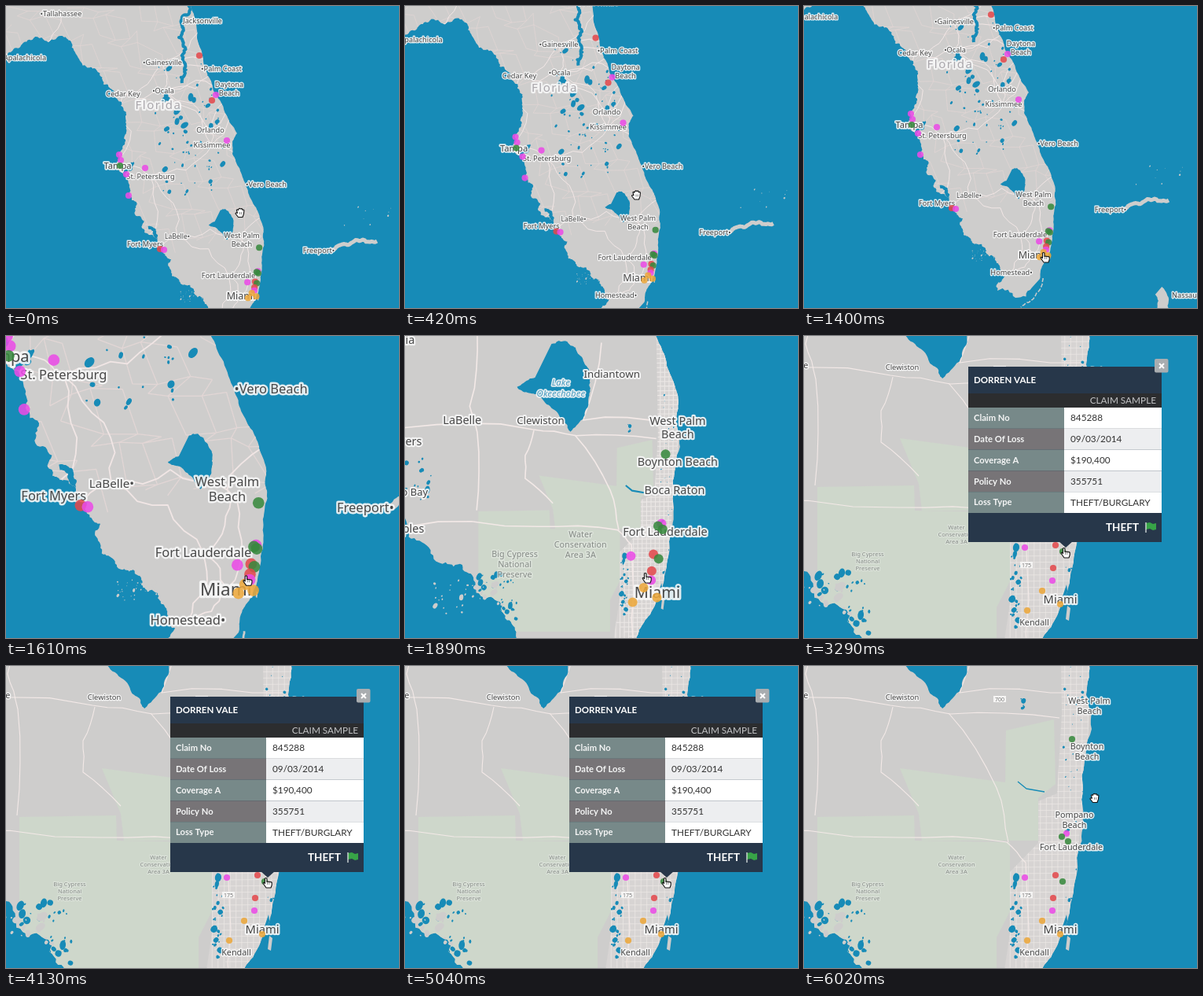
Recreate the animation shown at these times as an HTML page with a canvas. Size 500 by 384 pixels, loop 6090 ms.

```html
<!DOCTYPE html>
<html lang="en">
<head>
<meta charset="utf-8">
<title>Claims map</title>
<style>
  html, body { margin: 0; width: 100%; height: 100%; overflow: hidden; background: #178bb7; }
  canvas { display: block; }
</style>
</head>
<body>
<canvas id="stage" width="500" height="384"></canvas>
<script>
const ctx = document.getElementById('stage').getContext('2d');
const LOOP = 6090, STEP = 70;
const WATER = '#178bb7', LAND = '#cecdcc', PARK = '#ced7cb', ROAD = '#f3e9e7', GREY = '#868b87';
const MAP_FONT = '"Noto Sans", "Open Sans", sans-serif', CARD_FONT = 'Lato, sans-serif';
const PIN = { m: '#ea4be6', g: '#37893d', r: '#e2484c', o: '#eca63a' };

// Coordinates belong to a view: WIDE (whole state), MID or CLOSE (Miami).
const WIDE = 1, MID = 2.95, CLOSE = 4;
const FIX = [305.2, 309.3], DRAG = [8, 52];

let scale, level, panX, panY;

function random(seed) {
  return () => (seed = seed * 16807 % 2147483647) / 2147483647;
}
function ease(t, from, to) {
  const u = Math.min(1, Math.max(0, (t - from) / (to - from)));
  return u * u * (3 - 2 * u);
}
function shape(p, closed) {
  const path = new Path2D();
  for (let i = 0; i < p.length; i += 2) path.lineTo(p[i], p[i + 1]);
  if (closed) path.closePath();
  return path;
}
// Splits each stretch of a line in two, pushing the midpoint sideways.
function rough(p, amount, depth = 4, rnd = random(77)) {
  if (!depth) return p;
  const out = p.slice(0, 2);
  for (let i = 2; i < p.length; i += 2) {
    const [x0, y0, x1, y1] = p.slice(i - 2, i + 2), push = (rnd() - .5) * amount;
    out.push((x0 + x1) / 2 - (y1 - y0) * push, (y0 + y1) / 2 + (x1 - x0) * push, x1, y1);
  }
  return rough(out, amount, depth - 1, rnd);
}

const eastCoast = [232,-60, 235,0, 243,40, 252,75, 264,108, 278,134, 294,162, 288,172, 288,188, 305,227,
  318,256, 327.5,282, 328.4,304, 325.6,334, 322.6,356, 317.4,373, 309.4,387, 308,399];
const westCoast = [298,410, 254,414, 263,396, 257.5,384, 250.4,371, 239,360.5, 227,354, 211,343, 210,322,
  200,313, 190,295, 176,288, 164,265, 157,240, 152,214, 141,203, 143,188, 151,165, 152,140, 147,122,
  133,105, 120,89, 102,77, 84,48, 72,38, 35,41, 8,57, -10,62, -10,-60];
const land = shape([...rough(eastCoast, .12), ...rough(westCoast, .5)], true);
const inlets = [[232,-5, 223,18, 220,40, 227,72, 224,98], [151,213, 159,207, 161,199], [181,282, 190,297]]
  .map(p => shape(rough(p, .5)));
const bahama = shape(rough([416,311, 437,303, 472,299], .3));
const andros = shape(rough([459,414, 462,445], .3));
const keys = shape(rough([312,398, 303,419, 284,435], .2));
const lake = shape(rough([186,9, 206,6, 224,25, 235,55, 233,84, 210,121, 197,104, 170,75, 142,64, 165,52],
  .25), true);

const parks = [
  [122,130, 256,148, 257,82, 318,68, 320,150, 298,168, 298,222, 150,222, 146,188],
  [17,192, 140,190, 141,222, 262,224, 262,312, 245,345, 245,400, 17,400]
].map(p => shape(p, true));
const urban = shape([325,-120, 350,-120, 365,0, 361,100, 343,300, 311,384, 296,420, 250,420,
  262,340, 262,262, 298,225, 298,172, 322,162, 328,60], true);
const closeRoads = [
  [-110,219, 120,218, 258,224, 282,250, 285,420],
  [15,-120, 2,10, 15,55, 14,190],
  [-110,47, 110,50, 186,61, 325,66],
  [113,52, 98,95, 98,135, 146,178],
  [184,60, 245,155, 260,224],
  [230,-100, 198,34, 352,34]
].map(p => shape(rough(p, .08, 2)));
const canal = shape([272,147, 283,156, 306,160]);
const bay = shape([334,316, 338,345, 331,354, 326,340], true);
const beachKey = shape([335,343, 339,346, 337,362, 333,360], true);

const widePins = [['r',246,63], ['m',267,113], ['r',262,120], ['m',281,171], ['m',144,189], ['m',146,196],
  ['g',145,203], ['m',153,214], ['m',177,206], ['m',156,241], ['r',196,309], ['m',201,310]];
const closePins = [['g',341,93], ['m',334,213], ['g',328,217], ['g',336,223], ['m',281,269], ['r',320,266],
  ['g',329,274], ['r',317,295], ['m',316,311], ['o',303,324], ['o',326,341], ['o',284,349]];

const cities = [
  ['•Tallahassee',70,10], ['Apalachicola',24,66], ['Jacksonville',250,19], ['•Gainesville',199,72],
  ['•Palm Coast',274,80], ['•Ocala',200,108], ['Cedar Key',149,112], ['Daytona|Beach',284,106],
  ['Orlando',260,158], ['Kissimmee',262,177], ['Tampa',142,204,11.2], ['St. Petersburg',184,217],
  ['•Vero Beach',331,227], ['LaBelle•',218,294,8.5], ['Fort Myers',177,303], ['West Palm|Beach',300,298],
  ['Fort Lauderdale',283,343], ['Miami',299,369,12.5], ['Freeport•',398,311], ['Homestead•',272,391],
  ['Nassau',492,420]];
// Labels per zoom level: view, font size, then text, centre, own size, colour and style.
const labels = {
  1: [WIDE, 9.2, [...cities, ['Florida',194,127,15,'#aaa7ac']]],
  2: [MID, 14.5, [
    ['Arcadia',-14,5], ['Indiantown',263,48,13.4], ['Lake|Okeechobee',198,66,11.5,'#4d9dc0','italic'],
    ['LaBelle',72,107], ['Clewiston',172,108,13.4], ['West Palm|Beach',347,117], ['Fort Myers',-16,134],
    ['Boynton Beach',347,160], ['Boca Raton',343,197], ['Estero Bay',-4,199,13], ['Naples',0,246],
    ['Fort Lauderdale',331,250], ['Water|Conservation|Area 3A',223,266,10.8,GREY],
    ['Big Cypress|National|Preserve',139,291,10.8,GREY], ['Miami',321,327,20]]],
  4: [CLOSE, 10.8, [
    ['LaBelle',-13,38], ['Clewiston',125,40,9.4], ['West Palm|Beach',363,51.5], ['Boynton|Beach',360,109.5],
    ['Pompano|Beach',344,196.5], ['Fort Lauderdale',340,231], ['Water|Conservation|Area 3A',194,253,7.6,GREY],
    ['Big Cypress|National|Preserve',81,287,7.6,GREY], ['Miami',326,336,14.7], ['Kendall',293,365]]]
};

// Main roads join neighbouring cities; small ones form an uneven mesh.
const highways = new Path2D(), lanes = new Path2D();
cities.forEach(([, x0, y0], i) => cities.slice(i + 1).forEach(([, x1, y1]) => {
  if (Math.hypot(x1 - x0, y1 - y0) < 95) highways.addPath(shape(rough([x0, y0, x1, y1], .3, 3, random(i + 9))));
}));
function meshNode(c, r) {
  const wave = Math.sin(c * 12.99 + r * 78.23) * 437;
  return [c * 19 + wave % 9, r * 18 + wave * 7 % 9];
}
for (let c = 0; c < 18; c++) for (let r = 0; r < 24; r++) for (const [dc, dr] of [[1, 0], [0, 1]]) {
  if (r > 16 || (c * 5 + r * 3 + dc) % 4 === 0) continue;
  lanes.moveTo(...meshNode(c, r));
  lanes.lineTo(...meshNode(c + dc, r + dr));
}

// Time, x, y of the pointer.
const pointerPath = [[0,298,263], [70,298,263], [840,290,211], [930,290,211], [1300,307,320], [1440,307,320],
  [1700,308,308], [2060,308,308], [2440,333,276], [5070,333,276], [5330,455,38], [5440,455,38], [5700,370,168]];
const pointHand = new Path2D('M-3.5-6q1.3-1 2.4 0V-1.5q1.2-.9 2.2 0q1.2-.7 2.1 .3q1.3-.5 2 .6V2.5L4 6H-2L-5.5 1q-.8-1.6 .6-1.7L-3.5 .6Z');
const openHand = new Path2D('M-3.6 .2L-4.6-3.4q.9-1.6 2 0L-1.9-5q1.2-1.4 2 0L.6-5q1.3-1 2 .4L2.9-3.6q1.7-1 2 .5L4.4 1.6L3 5.5H-2.5L-6 1q0-1.7 2.4-.8Z');

function view(k) {
  const m = scale / k, [dx, dy] = k === WIDE ? DRAG : [0, 0];
  ctx.setTransform(m, 0, 0, m, FIX[0] - (FIX[0] + dx) * m + panX, FIX[1] - (FIX[1] + dy) * m + panY);
}
function fill(path, color) {
  ctx.fillStyle = color;
  ctx.fill(path);
}
function stroke(path, color, width) {
  ctx.strokeStyle = color;
  ctx.lineWidth = width;
  ctx.stroke(path);
}
function box(x, y, w, h, color) {
  ctx.fillStyle = color;
  ctx.fillRect(x, y, w, h);
}
function text(str, x, y, font, color, align = 'left') {
  ctx.font = font;
  ctx.textAlign = align;
  ctx.fillStyle = color;
  ctx.fillText(str, x, y);
}
function specks(count, x, y, w, h, size, color = WATER) {
  const rnd = random(count * 31 + 7);
  ctx.fillStyle = color;
  for (let i = 0; i < count; i++) {
    const r = size * (.25 + rnd() ** 3);
    ctx.beginPath();
    ctx.ellipse(x + rnd() * w, y + rnd() * h, r, r * (.7 + rnd()), rnd(), 0, 7);
    ctx.fill();
  }
}

function drawWideLand() {
  view(WIDE);
  stroke(lanes, '#e2d6d5', .7);
  stroke(highways, '#f1e6e5', 1);
  specks(90, 188, 70, 90, 170, 2.8);
}

function drawCloseLand() {
  view(CLOSE);
  const unit = CLOSE / level;
  parks.forEach(p => fill(p, PARK));
  fill(urban, '#d7d4d3');
  ctx.save();
  ctx.clip(urban);
  const grid = new Path2D();
  for (let i = -15; i < 53; i++) {
    grid.moveTo(250 + i * 37 % 30, i * 8);
    grid.lineTo(370, i * 8 - 1);
    grid.moveTo(250 + i * 7.5, -120);
    grid.lineTo(247 + i * 7.5, 420);
  }
  stroke(grid, '#ece8e6', .7 * unit);
  ctx.restore();
  closeRoads.forEach(p => stroke(p, ROAD, 1.1 * unit));
  stroke(canal, WATER, 1.4 * unit);
  specks(34, 263, 262, 14, 110, 3.6);
  specks(50, 330, -10, 30, 310, 1.8);
  specks(12, 276, 40, 4, 15, 2.4);
  specks(70, -40, 300, 125, 84, 4);
  specks(20, -110, 100, 45, 75, 4);
  fill(bay, WATER);
}

function drawShield(str, x, y) {
  box(x - 8, y - 4, 16, 8, '#f5f4f3');
  text(str, x, y + .5, '7px ' + MAP_FONT, '#777', 'center');
}

function drawLabels() {
  const [k, base, list] = labels[level];
  view(k);
  for (const [str, x, y, size = base, color = '#484848', style = ''] of list) {
    const lines = str.split('|');
    ctx.font = `${style} 500 ${size}px ${MAP_FONT}`;
    ctx.textAlign = 'center';
    ctx.letterSpacing = str === 'Florida' ? '1.5px' : '0px';
    lines.forEach((line, i) => {
      const ly = y + (i - (lines.length - 1) / 2) * size * 1.19;
      ctx.strokeStyle = color === GREY ? 'rgba(230,235,228,.6)' : 'rgba(246,246,246,.9)';
      ctx.lineWidth = size * .3;
      ctx.strokeText(line, x, ly);
      ctx.fillStyle = color;
      ctx.fillText(line, x, ly);
    });
  }
  ctx.letterSpacing = '0px';
  if (level === 4) {
    drawShield('700', 249, 42);
    drawShield('175', 283, 291);
  }
}

function drawPins(k, pins) {
  view(k);
  ctx.globalAlpha = .87;
  for (const [kind, x, y] of pins) {
    ctx.beginPath();
    ctx.arc(x, y, 4.1 * k / level, 0, 7);
    ctx.fillStyle = PIN[kind];
    ctx.fill();
  }
  ctx.globalAlpha = 1;
}

function drawMap() {
  ctx.resetTransform();
  box(0, 0, 500, 384, WATER);
  ctx.lineJoin = 'round';
  view(WIDE);
  fill(land, LAND);
  stroke(bahama, LAND, 5);
  stroke(andros, LAND, 13);
  specks(9, 430, 255, 60, 35, 1.2, LAND);
  ctx.setLineDash([5, 2]);
  stroke(keys, LAND, 1.5);
  ctx.setLineDash([]);
  ctx.save();
  ctx.clip(land);
  if (level === 1) drawWideLand(); else drawCloseLand();
  view(WIDE);
  inlets.forEach(p => stroke(p, WATER, 4));
  view(MID);
  fill(lake, WATER);
  ctx.restore();
  view(CLOSE);
  fill(beachKey, LAND);
  specks(40, -60, 310, 120, 60, 4, LAND);
  drawLabels();
  drawPins(WIDE, widePins);
  drawPins(CLOSE, closePins);
  ctx.resetTransform();
}

function drawCard() {
  const navy = '#27374a';
  fill(shape([324,261, 342,261, 333,269], true), navy);
  box(209, 39, 246, 223, navy);
  text('DORREN VALE', 216, 56, 'bold 11.5px ' + CARD_FONT, '#fff');
  box(209, 73, 246, 18, '#2c2d2f');
  text('CLAIM SAMPLE', 448, 82, '11.8px ' + CARD_FONT, '#c3c4c6', 'right');
  [['Claim No', '845288'], ['Date Of Loss', '09/03/2014'], ['Coverage A', '$190,400'],
    ['Policy No', '355751'], ['Loss Type', 'THEFT/BURGLARY']].forEach(([name, value], i) => {
    const y = 91 + i * 26.8;
    box(209, y, 122, 26.8, i % 2 ? '#777477' : '#778989');
    box(331, y, 124, 26.8, i % 2 ? '#edeef0' : '#fff');
    text(name, 216, y + 13.8, 'bold 11.2px ' + CARD_FONT, '#f4f5f5');
    text(value, 339, y + 13.8, '11.8px ' + CARD_FONT, '#333');
  });
  text('THEFT', 426, 243.5, 'bold 13.5px ' + CARD_FONT, '#fff', 'right');
  fill(shape([435,238, 440,237, 444,239, 448,238, 448,246, 444,247, 440,245, 435,246], true), '#37a447');
  stroke(shape([435,237, 435,250]), '#dfe5e2', 1.3);
  ctx.beginPath();
  ctx.roundRect(446, 29, 17.5, 17.5, 2);
  ctx.fillStyle = '#a9adb0';
  ctx.fill();
  stroke(shape([452,35, 458,41]), '#fff', 2);
  stroke(shape([458,35, 452,41]), '#fff', 2);
}

function drawPointer(t) {
  let i = 0;
  while (i < pointerPath.length - 1 && pointerPath[i + 1][0] <= t) i++;
  const [t0, x0, y0] = pointerPath[i], [t1, x1, y1] = pointerPath[i + 1] || [LOOP, x0, y0];
  const u = ease(t, t0, t1);
  ctx.translate(x0 + (x1 - x0) * u, y0 + (y1 - y0) * u);
  const hand = t < 1200 || t > 5480 ? openHand : pointHand;
  fill(hand, '#fff');
  stroke(hand, '#111', 1.1);
  for (const x of [-.5, 1.7]) stroke(shape([x, -1, x, 2]), '#333', .6);
  ctx.resetTransform();
}

function draw(now) {
  const t = Math.floor(now % LOOP / STEP) * STEP;
  const rest = 1 - ease(t, 70, 840);
  panX = DRAG[0] * rest;
  panY = DRAG[1] * rest;
  scale = 1 + ease(t, 1440, 1680) + 2 * ease(t, 1770, 2020);
  level = t < 1690 ? 1 : t < 2020 ? 2 : 4;
  ctx.textBaseline = 'middle';
  drawMap();
  const shown = ease(t, 2730, 2940) * (1 - ease(t, 5400, 5540));
  if (shown) {
    ctx.globalAlpha = shown;
    drawCard();
    ctx.globalAlpha = 1;
  }
  drawPointer(t);
}

const start = performance.now();
(function tick() {
  draw(performance.now() - start);
  requestAnimationFrame(tick);
})();
</script>
</body>
</html>
```
